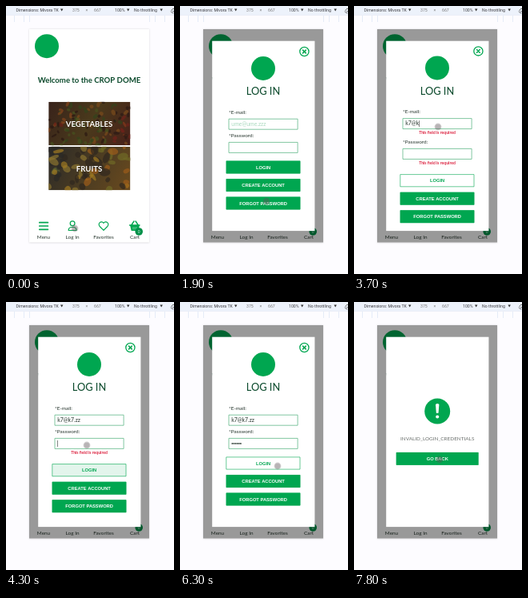
Recreate the animation shown at these times as an HTML page with a canvas. Size 210 by 335 pixels, loop 8 s.

```html
<!DOCTYPE html>
<html lang="en">
<head>
<meta charset="utf-8">
<title>Shop login</title>
<style>
  html, body { margin: 0; width: 100%; height: 100%; overflow: hidden; background: #fdfcff; }
  canvas { display: block; width: 210px; height: 335px; }
</style>
</head>
<body>
<canvas id="stage"></canvas>
<script>
const W = 210, H = 335, LOOP = 8000, STEP = 100;
const GREEN = '#00a650', DARK = '#0b4a2c', INK = '#26352d', RED = '#dc2340';
const LATO = 'Lato, sans-serif', ARIAL = '"Liberation Sans", Arial, sans-serif';
const EMAIL = 'k7@k7.zz', PLACEHOLDER = 'ume@ume.zzz';

const canvas = document.getElementById('stage');
const ctx = canvas.getContext('2d');
const dpr = window.devicePixelRatio || 1;
canvas.width = W * dpr;
canvas.height = H * dpr;

const clamp = v => Math.max(0, Math.min(1, v));
const progress = (t, from, length) => clamp((t - from) / length);

function rect(x, y, w, h, fill) {
  ctx.fillStyle = fill;
  ctx.fillRect(x, y, w, h);
}

function frame(x, y, w, h, color, line = 0.8) {
  ctx.strokeStyle = color;
  ctx.lineWidth = line;
  ctx.strokeRect(x + line / 2, y + line / 2, w - line, h - line);
}

function disc(x, y, r, fill) {
  ctx.beginPath();
  ctx.arc(x, y, r, 0, 7);
  ctx.fillStyle = fill;
  ctx.fill();
}

function text(str, x, y, font, fill, align = 'center') {
  ctx.font = font;
  ctx.textAlign = align;
  ctx.fillStyle = fill;
  ctx.fillText(str, x, y);
}

function stroke(path, width, color = GREEN) {
  ctx.strokeStyle = color;
  ctx.lineWidth = width;
  ctx.lineCap = ctx.lineJoin = 'round';
  ctx.stroke(new Path2D(path));
}

function mix(a, b, k) {
  return `rgb(${a.map((v, i) => Math.round(v + (b[i] - v) * k)).join()})`;
}

// Pointer path: time, x, y
const pointerKeys = [
  [0, 86, 278], [1600, 86, 278], [1900, 108, 244], [2200, 105, 202],
  [2400, 105, 202], [2700, 105, 151], [3900, 105, 151], [4200, 101, 179],
  [5700, 101, 179], [6100, 122, 205], [7400, 122, 205], [7800, 107, 197]
];

function pointerAt(t) {
  const next = pointerKeys.findIndex(k => k[0] > t);
  if (next < 0) return pointerKeys[pointerKeys.length - 1].slice(1);
  const a = pointerKeys[next - 1], b = pointerKeys[next];
  const k = (t - a[0]) / (b[0] - a[0]);
  return [a[1] + (b[1] - a[1]) * k, a[2] + (b[2] - a[2]) * k];
}

function drawPointer(t) {
  const [x, y] = pointerAt(t);
  disc(x, y, 4.4, 'rgba(95,85,90,.3)');
  disc(x, y, 3.3, 'rgba(95,85,90,.2)');
}

function arrow(x) {
  ctx.beginPath();
  ctx.moveTo(x, 3.6);
  ctx.lineTo(x + 3.4, 3.6);
  ctx.lineTo(x + 1.7, 6.4);
  ctx.fillStyle = '#333';
  ctx.fill();
}

function drawToolbar() {
  rect(0, 0, W, H, '#fdfcff');
  rect(0, 0, W, 11, '#edf2fb');
  rect(0, 11, W, 0.6, '#dfe6f2');
  for (const x of [10, 22, 29, 179, 186, 198]) rect(x, 12, 0.8, 8, '#dfe8f7');
  const font = '5.2px Roboto, sans-serif';
  const label = (s, x, color = '#3c3c40') => text(s, x, 7, font, color, 'left');
  label('Dimensions: Mivora TK', 12.6);
  arrow(68);
  label('375', 83, '#777');
  label('×', 99.5, '#777');
  label('667', 110, '#777');
  label('100%', 136);
  arrow(151);
  label('No throttling', 160);
  arrow(192.5);
  stroke('M207 5 l2 -2 l2 2 l-2 2 z M206 7 q1 2 3 2', 0.7, '#444');
}

function drawPhoto(y, tones, palette, seed, size, count, label) {
  const x0 = 53.2, w = 102.2, h = 54.5;
  const random = () => (seed = (seed * 16807) % 2147483647) / 2147483647;
  const base = ctx.createLinearGradient(x0, y, x0 + w, y + h);
  tones.forEach((tone, i) => base.addColorStop(i / (tones.length - 1), tone));
  ctx.save();
  ctx.beginPath();
  ctx.rect(x0, y, w, h);
  ctx.clip();
  rect(x0, y, w, h, base);
  ctx.globalAlpha = 0.7;
  for (let i = 0; i < count; i++) {
    const x = random();
    const pick = clamp(x * 0.6 + random() * 0.4) * palette.length * 0.999;
    ctx.beginPath();
    ctx.ellipse(x0 + x * w, y + random() * h, size * (0.5 + random()),
      size * (0.4 + random() * 0.6), random() * 3, 0, 7);
    ctx.fillStyle = palette[Math.floor(pick)];
    ctx.fill();
  }
  ctx.restore();
  text(label, 104, y + 30.8, `bold 9.6px ${LATO}`, '#fff');
}

function drawNav() {
  stroke('M41.8 270.7 H52.4 M41.8 275 H52.4 M41.8 279.3 H52.4', 1.7);
  stroke('M86 271.8 a2.9 2.9 0 1 1 -5.8 0 a2.9 2.9 0 1 1 5.8 0 M78.2 280.5 q0 -4 4 -4 h1.8 q4 0 4 4 z', 1.2);
  stroke('M122 280.3 l-4.8 -4.8 c-3.2 -3.5 1.8 -8 4.8 -4.2 c3 -3.8 8 .7 4.8 4.2 z', 1.2);
  stroke('M154.5 274 H167 M157 273.5 l3 -4.5 M165 273.5 l-3 -4.5', 1.4);
  ctx.fillStyle = GREEN;
  ctx.fill(new Path2D('M155 274 H167 L165.3 281 H156.7 Z'));
  stroke('M159 276.5 v2.6 M161 276.5 v2.6 M163 276.5 v2.6', 0.5, '#d8f2e2');
  disc(166.2, 282, 4.8, '#009048');
  text('0', 166.2, 283.8, `4.8px ${LATO}`, '#d8f2e2');
  [['Menu', 47], ['Log In', 83], ['Favorites', 122], ['Cart', 161]]
    .forEach(([s, x]) => text(s, x, 291.2, `6.4px ${LATO}`, INK));
}

function drawHome() {
  ctx.save();
  ctx.shadowColor = 'rgba(0,0,0,.16)';
  ctx.shadowBlur = 2 * dpr;
  rect(29, 29, 150, 266.5, '#fff');
  ctx.restore();
  disc(51, 50.2, 15, GREEN);
  text('Welcome to the CROP DOME', 104, 96.3, `bold 9.6px ${LATO}`, DARK);
  drawPhoto(119.8, ['#38221a', '#4a3a1c', '#482019'],
    ['#6a2018', '#85451c', '#2a1712', '#46521f', '#33441c', '#7a4a1c', '#2b1a14', '#70221a', '#86381a'],
    71, 2.6, 110, 'VEGETABLES');
  drawPhoto(175.8, ['#2b2a28', '#4a3b22', '#6a4a1e'],
    ['#59602f', '#2a2826', '#8a7430', '#a07a22', '#30271f', '#9c5c1a', '#6f6a26', '#a8701c'],
    29, 5, 60, 'FRUITS');
  drawNav();
}

function drawButton(label, x, y, w, white = 0) {
  const green = [0, 166, 80], paper = [255, 255, 255];
  rect(x, y, w, 15.8, mix(green, paper, white));
  frame(x, y, w, 15.8, GREEN, 0.6);
  text(label, x + w / 2, y + 9.9, `bold 5.75px ${ARIAL}`, white > 0.5 ? GREEN : '#fff');
}

function drawError(y) {
  text('This field is required', 104, y, `bold 5.1px ${LATO}`, RED);
}

function drawModal(alpha = 1) {
  ctx.globalAlpha = alpha;
  rect(40.2, 43.7, 128.2, 237.4, '#fff');
}

function drawField(label, y, value, color, caret) {
  text(label, 61, y - 5.8, `6.4px ${LATO}`, INK, 'left');
  frame(61, y, 86.5, 13.8, '#62b98a');
  text(value, 64.3, y + 9.2, `6.9px ${LATO}`, color, 'left');
  if (caret !== undefined) rect(64.3 + caret, y + 3, 0.6, 8, '#333');
}

// Tapped state of the login button: 0 is green, 1 is white
function loginWhiteness(t) {
  if (t < 4200) return progress(t, 2100, 250);
  if (t < 6000) return 1 - progress(t, 4200, 300) ** 2;
  return progress(t, 6050, 250);
}

function drawLogin(t) {
  const emailError = t >= 2300 && t < 3900;
  const passwordError = t >= 2300 && t < 5200;
  const typed = EMAIL.slice(0, Math.ceil(progress(t, 3400, 600) * EMAIL.length));
  const dots = Math.round(progress(t, 4700, 500) * 6);

  ctx.save();
  drawModal(progress(t, 900, 400));
  if (emailError) ctx.translate(0, -0.6);
  disc(104, 78, 15, GREEN);
  ctx.beginPath();
  ctx.arc(155.4, 57, 5.6, 0, 7);
  ctx.strokeStyle = GREEN;
  ctx.lineWidth = 1.3;
  ctx.stroke();
  stroke('M153.5 55.1 l3.8 3.8 m0 -3.8 l-3.8 3.8', 1.5);
  text('LOG IN', 104, 111.2, `12.8px ${LATO}`, DARK);

  ctx.font = `6.9px ${LATO}`;
  const emailCaret = t >= 2300 && t < 4200 ? ctx.measureText(typed).width : undefined;
  drawField('*E-mail:', 140.8, typed || PLACEHOLDER, typed ? INK : '#a9d9be', emailCaret);
  if (emailError) drawError(160.5);

  const y = 170 + (emailError ? 8.6 : 0);
  drawField('*Password:', y, '', INK, t >= 4200 && t < 6100 ? dots * 2.1 : undefined);
  for (let i = 0; i < dots; i++) disc(65.4 + i * 2.1, y + 6.9, 0.9, INK);
  if (passwordError) drawError(y + 20.4);

  const top = y + 23.6 + (passwordError ? 8.7 : 0);
  drawButton('LOGIN', 57.9, top, 92.4, loginWhiteness(t));
  drawButton('CREATE ACCOUNT', 57.9, top + 22.5, 92.4);
  drawButton('FORGOT PASSWORD', 57.9, top + 45, 92.4);
  ctx.restore();
}

// Crescent between two equal circles, one shifted sideways
function drawSpinner(t) {
  const r = 46.4, shift = 4.5;
  const tip = Math.acos(-shift / 2 / r);
  ctx.save();
  ctx.translate(104, 162.3);
  ctx.rotate(0.5 + (t - 6800) / 1000 * Math.PI * 2);
  ctx.beginPath();
  ctx.arc(0, 0, r, -tip, tip);
  ctx.arc(-shift, 0, r, Math.PI - tip, tip - Math.PI, true);
  ctx.fillStyle = '#fff';
  ctx.fill();
  ctx.restore();
}

function drawResult() {
  drawModal();
  disc(104.2, 136.5, 16, GREEN);
  ctx.fillStyle = '#fff';
  ctx.fill(new Path2D('M102 128 q2.2 -2 4.4 0 l-.8 10.5 q-1.4 1.2 -2.8 0 z'));
  disc(104.2, 143.4, 2, '#fff');
  text('INVALID_LOGIN_CREDENTIALS', 104.2, 172.6, `6.4px ${LATO}`, '#6b706d');
  drawButton('GO BACK', 53, 188, 102.5);
}

function draw(now) {
  const t = Math.floor((now % LOOP) / STEP) * STEP;
  ctx.setTransform(dpr, 0, 0, dpr, 0, 0);
  drawToolbar();
  drawHome();
  if (t >= 1000) {
    rect(29, 29, 150, 266.5, `rgba(0,0,0,${0.4 * progress(t, 900, 400)})`);
    if (t < 6800) drawLogin(t);
    else if (t < 7100) drawSpinner(t);
    else drawResult();
  }
  drawPointer(t);
}

let start;
function tick(now) {
  start ??= now;
  draw(now - start);
  requestAnimationFrame(tick);
}
requestAnimationFrame(tick);
</script>
</body>
</html>
```
